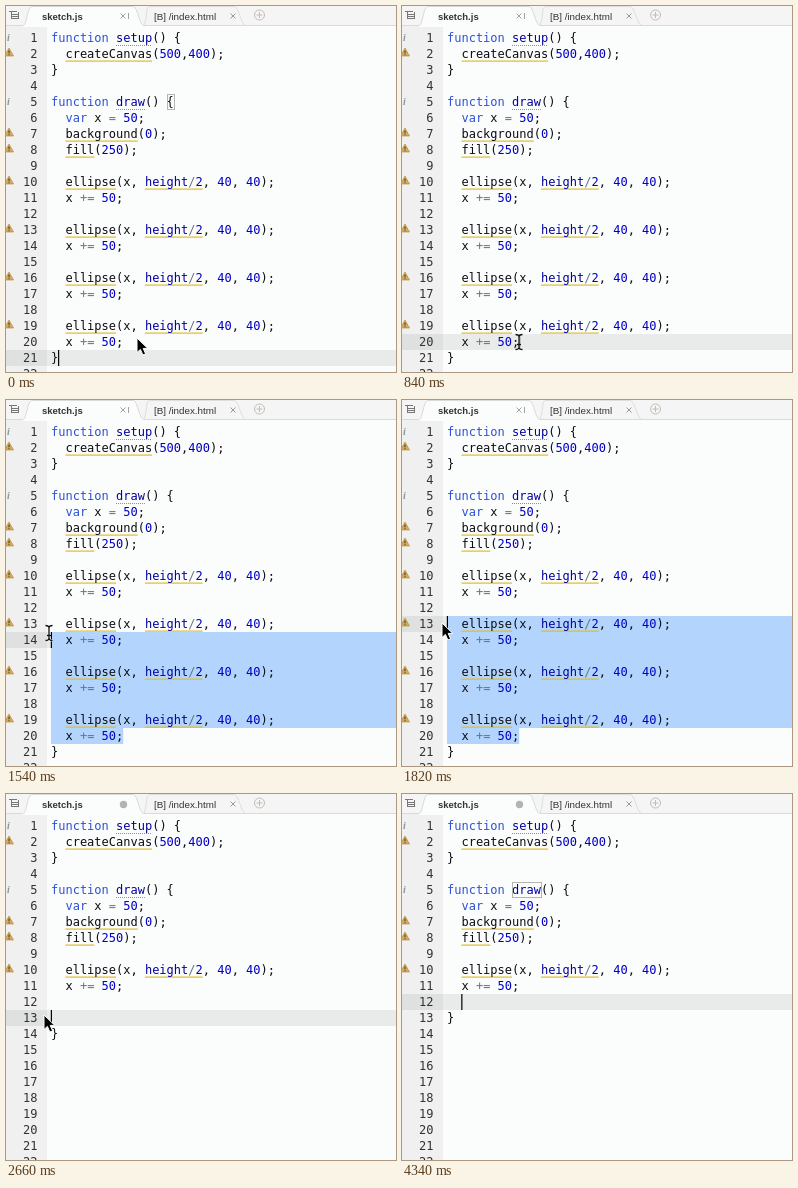
An HTML page that plays this animation: 390x366 px, repeating every 4890 ms.

```html
<!DOCTYPE html>
<html lang="en">
<head>
<meta charset="utf-8">
<title>Code editor</title>
<style>
  html, body { margin: 0; width: 100%; height: 100%; overflow: hidden; background: #fbfcfc; }
  svg { display: block; }
  text { white-space: pre; }
  .code { font: 12px "DejaVu Sans Mono", monospace; fill: #0c0c14; }
  .key { fill: #2c50d8; }
  .num { fill: #0000c4; }
  .name { fill: #0000a2; }
  .op { fill: #687687; }
  .tab { font-family: "Liberation Sans", sans-serif; fill: #333; }
  .info { font: italic bold 10px "Liberation Serif", serif; fill: #8d949c; }
</style>
</head>
<body>
<svg id="stage" width="390" height="366" viewBox="0 0 390 366">
  <rect width="390" height="366" fill="#fbfcfc"/>
  <rect y="20" width="41" height="346" fill="#f0f0f0"/>
  <g id="back"></g>
  <g id="code"></g>
  <rect id="box" fill="none" stroke="#b4b4b4"/>
  <rect id="caret" width="1.2" height="16" fill="#000"/>

  <rect width="390" height="20" fill="#f5f5f5"/>
  <path d="M0 19.5H17C21 19.5 21 .5 26 .5H127C132 .5 133 19.5 138 19.5H390" fill="#fbfcfc" stroke="#dadada"/>
  <path d="M138 19C142 10 139 .5 144 .5H228C233 .5 235 19.5 240 19.5" fill="none" stroke="#dedede"/>
  <path d="M17.500 20H137" stroke="#fbfcfc" stroke-width="2"/>
  <path d="M3 5.500H11M5 8.500H13M5 10.500H13M5 12.500H13M5.500 6V13M12.500 6V13" stroke="#777" fill="none"/>
  <text class="tab" x="36" y="13.500" font-size="9.500" font-weight="bold">sketch.js</text>
  <text class="tab" x="148" y="13.500" font-size="9.800">[B] /index.html</text>
  <path id="close" d="M114.500 7.500l5 5m0-5l-5 5M122.500 7v6" stroke="#a2a2a2"/>
  <circle id="dirty" cx="117.500" cy="10.500" r="3.700" fill="#b3b3b3"/>
  <path d="M224.500 7.500l5 5m0-5l-5 5" stroke="#999"/>
  <g fill="none" stroke="#c3beb3"><circle cx="253.500" cy="9" r="5"/><path d="M250.500 9h6m-3-3v6"/></g>

  <path id="arrow" d="M0 0V14.500L3.400 11.400L5.900 17L8.600 15.800L6.200 10.400H10.800Z" fill="#000" stroke="#fff" stroke-width="1"/>
  <g id="beam" fill="none">
    <path id="beamEdge" d="M-3.500 -7.500Q0 -7.500 0 -5V5Q0 7.500 -3.500 7.500M3.500 -7.500Q0 -7.500 0 -5V5Q0 7.500 3.500 7.500M-2 2.500H2" stroke="#fff" stroke-width="2.600" opacity=".7"/>
    <path d="M-3.500 -7.500Q0 -7.500 0 -5V5Q0 7.500 -3.500 7.500M3.500 -7.500Q0 -7.500 0 -5V5Q0 7.500 3.500 7.500M-2 2.500H2" stroke="#111" stroke-width="1.300"/>
  </g>
</svg>
<script>
const LOOP = 4890, CHAR = 7.224, LEFT = 45, ROW = 16;
const el = id => document.getElementById(id);
const top_ = row => 24 + (row - 1) * ROW;
const colX = col => LEFT + col * CHAR;

const head = ["function setup() {", "  createCanvas(500,400);", "}", "",
  "function draw() {", "  var x = 50;", "  background(0);", "  fill(250);", ""];
const pair = ["  ellipse(x, height/2, 40, 40);", "  x += 50;"];
const gap = "  ";
const docs = {
  full: [...head, ...pair, gap, ...pair, gap, ...pair, gap, ...pair, "}"],
  cut: [...head, ...pair, gap, "", "}"],
  done: [...head, ...pair, gap, "}"]
};

// time, pointer kind, pointer x, y, caret row, column, caret shown
const steps = [
  [0, "arrow", 131, 332, 21, 1, 1],
  [280, "arrow", 130, 332, 21, 1, 1],
  [420, "beam", 130, 338, 21, 1, 1],
  [560, "beam", 129, 337, 21, 1, 1],
  [700, "beam", 124, 337, 21, 1, 1],
  [840, "beam", 117, 336, 20, 10, 1],
  [980, "beam", 97, 331, 20, 7, 1],
  [1120, "beam", 74, 304, 18, 2, 1],
  [1260, "beam", 59, 274, 16, 2, 1],
  [1400, "beam", 49, 245, 14, 1, 1],
  [1540, "beam", 43, 233, 14, 0, 1],
  [1680, "beam", 42, 228, 13, 0, 1],
  [1820, "arrow", 40, 223, 13, 0, 1],
  [2240, "arrow", 39, 222, 13, 0, 1],
  [2380, "arrow", 38, 221, 13, 0, 1],
  [2520, "arrow", 38, 221, 13, 0, 0],
  [2660, "arrow", 38, 221, 13, 0, 1],
  [3220, "arrow", 38, 221, 12, 2, 1],
  [3780, "arrow", 37, 232, 12, 2, 1],
  [3920, "arrow", 35, 262, 12, 2, 1],
  [4060, "arrow", 33, 302, 12, 2, 1],
  [4200, "arrow", 31, 344, 12, 2, 1],
  [4340, "", 0, 0, 12, 2, 1]
];

const tag = (cls, s) => `<tspan class="${cls}">${s}</tspan>`;
const paint = s => s
  .replace(/(function )(\w+)|\bvar\b|\d+|\+=|[=\/]/g, (m, fn, name) =>
    fn ? tag("key", fn) + tag("name", name)
      : m === "var" ? tag("key", m)
      : /\d/.test(m) ? tag("num", m) : tag("op", m))
  .replace("height", tag("name", "height"));

const rect = (x, y, w, h, fill) =>
  `<rect x="${x}" y="${y}" width="${w}" height="${h}" fill="${fill}"/>`;

function underline(line, row) {
  let out = "";
  const info = line.match(/^function (\w+)/);
  if (info) {
    const x = colX(9), y = top_(row) + 15.5;
    out += `<path d="M${x} ${y}H${x + info[1].length * CHAR}" stroke="#8f8f8f" stroke-dasharray="1 1"/>`;
  }
  for (const m of line.matchAll(/createCanvas|background|fill|ellipse|height\/2/g))
    out += rect(colX(m.index), top_(row) + 14.5, m[0].length * CHAR, 1.2, "#dfbd2b");
  return out;
}

function marker(line, row) {
  const y = top_(row);
  if (/^function/.test(line)) return `<text class="info" x="1" y="${y + 11}">i</text>`;
  if (!/\w\(/.test(line)) return "";
  return `<path d="M3 ${y + 2}L7.500 ${y + 10}H-1.500Z" fill="#d3aa59" stroke="#b58e48" stroke-width=".7" stroke-linejoin="round"/>` +
    `<path d="M3 ${y + 4.5}v2.800m0 1v1" stroke="#5d461b" stroke-width="1.200"/>`;
}

function codeMarkup(lines) {
  let out = "";
  for (let row = 1; row <= 22; row++) {
    const line = lines[row - 1] || "", y = top_(row) + 12;
    out += `<text class="code" style="fill:#333" x="31.500" y="${y}" text-anchor="end">${row}</text>`;
    out += marker(line, row) + underline(line, row);
    if (line.trim()) out += `<text class="code" x="${LEFT}" y="${y}">${paint(line)}</text>`;
  }
  return out;
}

function backMarkup(row, col, selected) {
  const y = top_(row);
  let out = rect(0, y, 41, ROW, "#dfe0e0") + rect(41, y, 349, ROW, "#e9ebeb");
  if (!selected) return out;
  for (let r = row; r <= 20; r++) {
    const x = r === row ? colX(col) : LEFT;
    const end = r === 20 ? colX(10) : 390;
    out += rect(x, top_(r), Math.max(0, end - x), ROW, "#b3d5fd");
  }
  return out;
}

function setBox(col, len) {
  const box = el("box");
  box.setAttribute("visibility", len ? "visible" : "hidden");
  if (!len) return;
  box.setAttribute("x", Math.round(colX(col)) + 0.5);
  box.setAttribute("y", top_(5) + 0.5);
  box.setAttribute("width", Math.round(len * CHAR));
  box.setAttribute("height", 15);
}

const show = (id, on) => el(id).setAttribute("visibility", on ? "visible" : "hidden");
let shownDoc = "", shownStep = null;

function render(t) {
  const step = steps.filter(s => s[0] <= t).pop();
  const [, kind, mx, my, row, col, caretOn] = step;
  const doc = t < 2660 ? "full" : t < 3220 ? "cut" : "done";
  if (doc !== shownDoc) {
    el("code").innerHTML = codeMarkup(docs[doc]);
    shownDoc = doc;
  }
  if (step !== shownStep) {
    el("back").innerHTML = backMarkup(row, col, t >= 840 && t < 2660);
    el("caret").setAttribute("x", colX(col) - 0.2);
    el("caret").setAttribute("y", top_(row));
    for (const id of ["arrow", "beam"]) {
      show(id, kind === id);
      el(id).setAttribute("transform", `translate(${mx} ${my})`);
    }
    shownStep = step;
  }
  show("caret", caretOn);
  show("close", doc === "full");
  show("dirty", doc !== "full");
  if (t < 840) setBox(16, 1);
  else if (t >= 3500) setBox(9, 4);
  else setBox(0, 0);
}

const start = performance.now();
function tick() {
  render((performance.now() - start) % LOOP);
  requestAnimationFrame(tick);
}
render(0);
requestAnimationFrame(tick);
</script>
</body>
</html>
```
